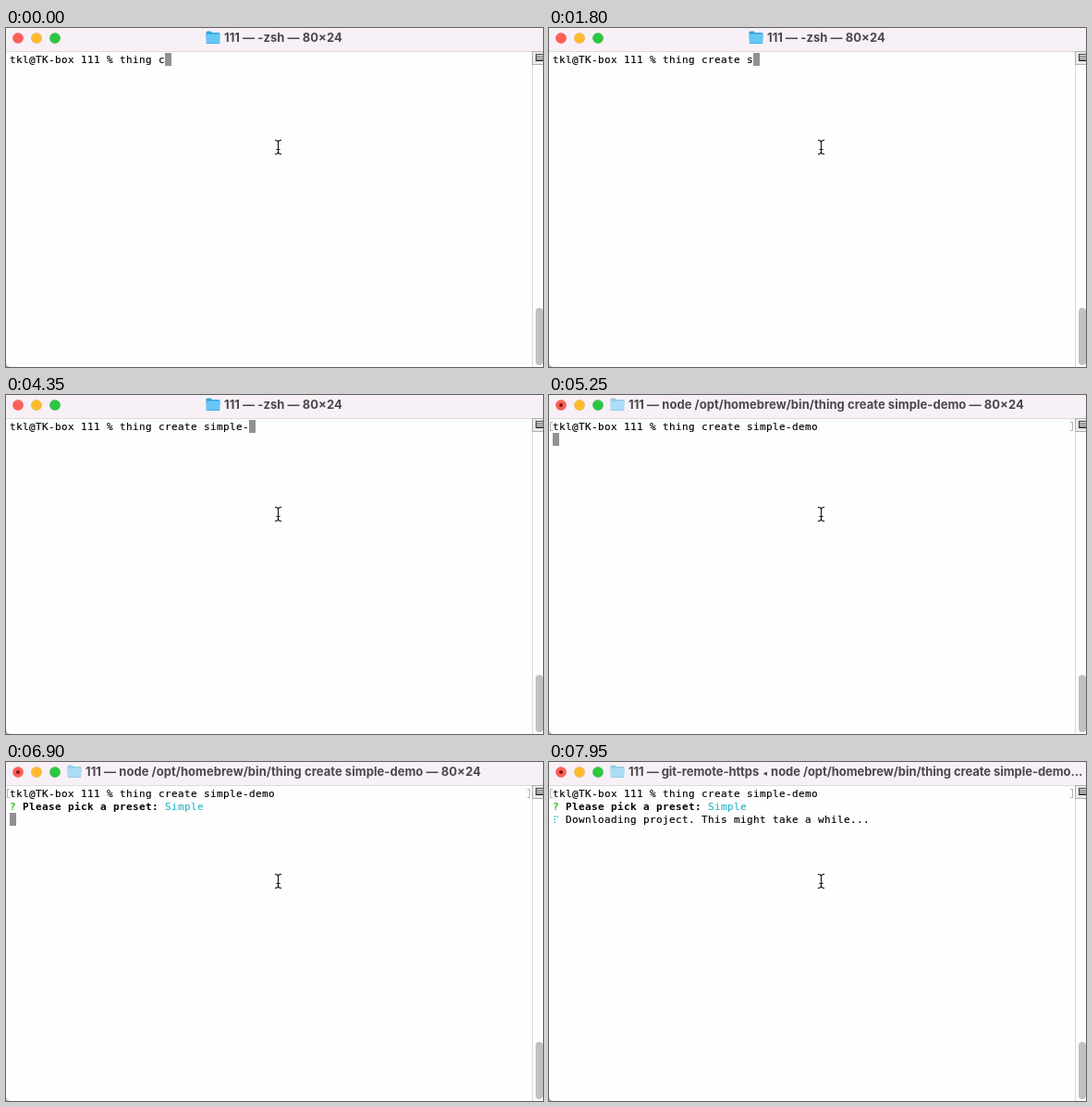
An HTML page that plays this animation: 581x367 px, repeating every 8 s.

```html
<!DOCTYPE html>
<html lang="en">
<head>
<meta charset="utf-8">
<title>Terminal</title>
<style>
html, body { margin: 0; width: 100%; height: 100%; overflow: hidden; background: #b9b9b9; }
#win {
  position: absolute; left: 0; top: 0; width: 581px; height: 367px; overflow: hidden;
  background: #fefefe; border-bottom-left-radius: 5px;
}
#win > * { position: absolute; }
#bar { left: 0; top: 0; width: 581px; height: 25px; background: #f8f0f7; border-bottom: 1px solid #dfd9de; }
#title {
  top: 2px; white-space: pre; color: #4b474b; letter-spacing: .05px;
  font: 700 13px/17px Inter, "DejaVu Sans", sans-serif;
}
#title.cut { letter-spacing: -.05px; }
#title small { font-size: 9px; line-height: 1; padding: 0 1.2px; }
#art { left: 0; top: 0; }
#screen { left: 0; top: 27px; }
.row {
  position: absolute; left: 4px; height: 14px; white-space: pre; color: #000;
  font: 11px/14px "DejaVu Sans Mono", monospace; letter-spacing: calc(7px - 1ch);
  -webkit-text-stroke: .15px;
}
.row i { position: absolute; top: 1px; font-style: normal; }
.row .b, .row .green { font-weight: 700; -webkit-text-stroke: 0; }
.green { color: #35b81f; }
.cyan { color: #2fb5c4; }
.gray { color: #a3a3a3; }
#caret { width: 7px; height: 14px; background: #919191; }
.mark { top: 29px; width: 2px; height: 8px; border: 1px solid #b4b4b4; }
</style>
</head>
<body>
<div id="win">
  <div id="bar"></div>
  <div id="caret"></div>
  <div id="screen"></div>
  <div class="mark" style="left:1px;border-right:0"></div>
  <div class="mark" style="left:564px;border-left:0"></div>
  <svg id="art" width="581" height="367">
    <defs>
      <path id="beam" d="M291.5 121.5q3 0 3 2.500v10q0 2.500-3 2.500M297.5 121.500q-3 0-3 2.500v10q0 2.500 3 2.500M293 131.500h3"/>
    </defs>
    <g stroke="#000" stroke-opacity=".12" stroke-width=".5">
      <circle cx="13" cy="11" r="5.800" fill="#fe5f58"/>
      <circle cx="33" cy="11" r="5.800" fill="#febb2f"/>
      <circle cx="53" cy="11" r="5.800" fill="#2ac840"/>
    </g>
    <circle id="busy" cx="13" cy="11" r="2" fill="#7d1410"/>
    <g id="folder">
      <path d="M.5 5q0-1.500 1.500-1.500h3.500l1.500 1.500h7q1.500 0 1.500 1.500v4h-15z" fill="#2fa3dc"/>
      <rect x=".5" y="6.500" width="15" height="10.500" rx="1.300" fill="#66c7f5"/>
      <path d="M1 16.500h14" stroke="#45aee2"/>
    </g>
    <path d="M569.5 26V367" stroke="#d9d9d9"/>
    <rect x="569.5" y="25.500" width="13" height="14" fill="#e9e9e9" stroke="#b0b0b0"/>
    <rect x="573.5" y="28.500" width="9" height="7" fill="#fff" stroke="#3c3c3c"/>
    <path d="M574 30.500h7M574 32.500h7M574 34.500h7" stroke="#555"/>
    <rect x="573" y="303" width="8" height="62" rx="4" fill="#c1c1c1"/>
    <g id="spin" fill="#35b9c8"></g>
    <g fill="none" stroke-linecap="square">
      <use href="#beam" stroke="#fff" stroke-width="2.600"/>
      <use href="#beam" stroke="#111" stroke-width="1.100"/>
    </g>
  </svg>
  <div id="title"></div>
</div>
<script>
const LOOP = 8000, TICK = 150;
const PROMPT = 'tkl@TK-box 111 % thing c';
const REST = 'reate simple-demo';
const COMMAND = 'node /opt/homebrew/bin/thing create simple-demo';
const CHILD = '<small>◂</small> ' + COMMAND;

// [time, letters typed after the prompt]
const TYPING = [
  [0, 0], [150, 1], [300, 2], [450, 3], [600, 4], [750, 5], [1350, 6],
  [1800, 7], [1950, 8], [2250, 9], [3300, 10], [3450, 11], [3600, 12],
  [4350, 13], [4500, 14], [4650, 15], [4800, 17]
];
// [time, text, left]
const TITLES = [
  [0, '111 — -zsh — 80×24', 236],
  [5250, `111 — ${COMMAND} — 80×24`, 86],
  [7050, `111 — npm ${CHILD} — 80×24`, 86],
  [7500, `111 — git-remote-https ${CHILD}...`, 86]
];
const ENTER = 5100, RUN = 5250, MENU = 6150, PICKED = 6900, LOADING = 7200;
const SPINNER = '⠋⠙⠹⠸⠼⠴⠦⠧⠇⠏';

const $ = id => document.getElementById(id);
const marks = document.querySelectorAll('.mark');
const at = (table, t) => table.filter(step => step[0] <= t).pop();
const show = (el, on) => { el.style.visibility = on ? 'visible' : 'hidden'; };

// Each part is [column, text, class]
const row = (n, ...parts) => `<div class="row" style="top:${n * 14}px">` +
  parts.map(([col, text, cls = '']) =>
    `<i class="${cls}" style="left:${col * 7}px">${text}</i>`).join('') + '</div>';

const question = (text, cls) =>
  row(1, [0, '?', 'green'], [2, 'Please pick a preset:', 'b'], [24, text, cls]);

const rule = name => `-----${name}------`;

const menu = () => question('(Use arrow keys)', 'gray') +
  row(2, [2, rule('Project'), 'gray']) +
  row(3, [0, '❯', 'cyan'], [2, 'Simple', 'cyan']) +
  row(4, [2, 'Framework']) +
  row(5, [2, rule('Resource'), 'gray']) +
  row(6, [2, 'Prefab']) +
  row(7, [2, 'Plugin']) +
  row(8, [2, rule('Common'), 'gray']) +
  row(9, [2, 'Dev Base']);

function screen(t) {
  let html = row(0, [0, PROMPT + REST.slice(0, at(TYPING, t)[1])]);
  if (t >= PICKED) html += question('Simple', 'cyan');
  else if (t >= MENU) html += menu();
  if (t >= LOADING) html += row(2, [2, 'Downloading project. This might take a while...']);
  return html;
}

function caretCell(t) {
  if (t < ENTER) return [PROMPT.length + at(TYPING, t)[1], 0];
  if (t < MENU) return [0, 1];
  if (t >= PICKED && t < LOADING) return [0, 2];
  return null;
}

// Braille bits 0-2 are the left column, 3-5 the right one
function spinner(t) {
  if (t < LOADING) return '';
  const bits = SPINNER.charCodeAt(Math.floor((t - LOADING) / 80) % 10) - 0x2800;
  let dots = '';
  for (let i = 0; i < 6; i++) {
    if (bits >> i & 1) {
      dots += `<rect x="${i < 3 ? 5.5 : 8.3}" y="${58.4 + i % 3 * 3}" width="1.5" height="1.5"/>`;
    }
  }
  return dots;
}

function render(t) {
  const [, title, left] = at(TITLES, t);
  $('title').innerHTML = title;
  $('title').className = title.endsWith('...') ? 'cut' : '';
  $('title').style.left = left + 'px';
  $('folder').setAttribute('transform', `translate(${left - 20} 0)`);
  $('folder').setAttribute('opacity', t < RUN ? 1 : 0.5);
  show($('busy'), t >= RUN);
  marks.forEach(m => show(m, t >= ENTER));
  $('screen').innerHTML = screen(t);
  $('spin').innerHTML = spinner(t);
  const cell = caretCell(t);
  show($('caret'), cell);
  if (cell) {
    $('caret').style.left = 4 + cell[0] * 7 + 'px';
    $('caret').style.top = 27 + cell[1] * 14 + 'px';
  }
}

const start = performance.now();
let last = -1;
function frame() {
  const t = Math.floor((performance.now() - start) % LOOP / TICK) * TICK;
  if (t !== last) render(last = t);
  requestAnimationFrame(frame);
}
frame();
</script>
</body>
</html>
```
